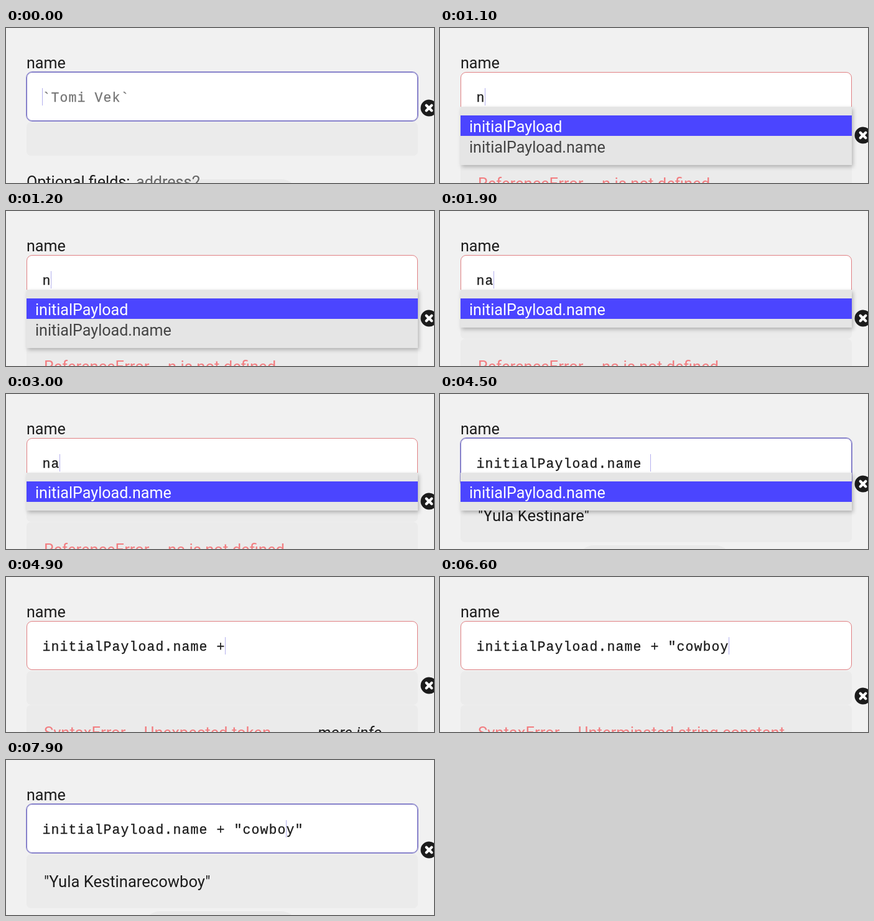
Animation, 688 px wide and 250 px high, one loop 8000 ms. Source, as an HTML page:

```html
<!DOCTYPE html>
<html lang="en">
<head>
<meta charset="utf-8">
<title>Field editor</title>
<style>
  html, body { margin: 0; width: 100%; height: 100%; overflow: hidden; background: #f1f1f1; }
  svg { display: block; width: 688px; height: 250px; }
  text { font: 25.1px Roboto, sans-serif; fill: #1c1c1c; white-space: pre; }
  .code { font: 21.5px "Liberation Mono", monospace; letter-spacing: 1.1px; stroke: #1c1c1c; stroke-width: .3; }
  .code.hint { fill: #757575; stroke: #757575; }
  .panel { fill: #ebebeb; }
  #field { fill: #fff; stroke: #e08083; }
  #field.focus { stroke: #7b75c4; }
  #ring { fill: none; stroke: #918cd0; }
  #caret { fill: #b4b0ee; }
  #value, #error text { font-size: 25.6px; }
  #error text { fill: #f27d80; }
  #error #more { font-size: 25px; font-style: italic; fill: #1c1c1c; }
  #menu { filter: drop-shadow(2px 3px 3px rgba(0, 0, 0, .25)); }
  #menu text { fill: #444; }
  #menu .on { fill: #fff; }
</style>
</head>
<body>
<svg viewBox="0 0 688 250">
  <rect width="688" height="250" fill="#f1f1f1"/>
  <rect x="222" y="244" width="246" height="50" rx="25" fill="#e9e9e9"/>
  <g id="optional">
    <text x="33" y="257">Optional fields:</text>
    <text x="209" y="257" style="fill:#666">address2</text>
  </g>
  <text x="33" y="65">name</text>
  <rect id="result" class="panel" x="33" y="152" width="629" height="54" rx="7"/>
  <text id="value" x="61" y="205"></text>
  <g id="error">
    <rect class="panel" x="33" y="206.5" width="629" height="88" rx="7"/>
    <text id="message" x="61" y="260"></text>
    <text id="more" x="501" y="260">more info</text>
  </g>
  <rect id="ring" x="32.5" y="70.5" width="630" height="80" rx="9.5"/>
  <rect id="field" x="33.5" y="71.5" width="628" height="78" rx="8.5"/>
  <text id="code" class="code" x="58.5" y="119"></text>
  <g id="menu">
    <rect id="sheet" x="33" y="127" width="629" height="94" fill="#e5e5e5"/>
    <rect x="33" y="141" width="629" height="33" fill="#4b45ff"/>
    <text id="row1" class="on" x="47" y="168"></text>
    <text id="row2" x="47" y="201"></text>
  </g>
  <rect id="caret" y="97" width="1" height="28"/>
  <g id="close">
    <circle r="13.5" fill="#1b1b1b"/>
    <path d="M-4.3-4.3 4.3 4.3M4.3-4.3-4.3 4.3" stroke="#fff" stroke-width="4.2" stroke-linecap="round"/>
  </g>
</svg>
<script>
const LOOP = 8000, CHAR = 14, LEFT = 58;
const PERSON = 'Yula Kestinare', HINT = '`Tomi Vek`';
const PATH = 'initialPayload.name', ROWS = ['initialPayload', PATH];
const OPEN = PATH + ' + "';

const undef = name => ({ error: `ReferenceError – ${name} is not defined`, icon: 173 });
const token = { error: 'SyntaxError – Unexpected token', icon: 175, more: true };
const string = { error: 'SyntaxError – Unterminated string constant', icon: 192 };
const value = text => ({ value: `"${text}"`, icon: 145 });

// Each edit puts the caret at the end and refreshes the suggestions
const type = (text, view, rows = []) => ({ text, view, rows, caret: text.length });

// [start ms, what changes from then on]
const steps = [
  [0, type('', { icon: 129 })],
  [200, { caret: null }],
  [700, { caret: 0 }],
  [1000, type('n', undef('n'), ROWS)],
  [1700, { caret: null }],
  [1900, type('na', undef('na'), [PATH])],
  [2400, { caret: null }],
  [2900, { caret: 2 }],
  [3100, type(PATH, value(PERSON))],
  [3600, { caret: null }],
  [4100, { caret: PATH.length }],
  [4500, type(PATH + ' ', value(PERSON), [PATH])],
  [4900, type(PATH + ' +', token)],
  [5200, type(PATH + ' + ', token)],
  [5400, type(OPEN, string)],
  [5800, type(OPEN + 'c', string)],
  [5900, type(OPEN + 'co', string)],
  [6000, type(OPEN + 'cow', string)],
  [6400, type(OPEN + 'cowb', string)],
  [6500, type(OPEN + 'cowbo', string)],
  [6600, type(OPEN + 'cowboy', string)],
  [6900, type(OPEN + 'cowboy"', value(PERSON + 'cowboy'))],
  [7400, { caret: null }],
  [7800, { caret: OPEN.length + 6 }],
  [7900, { caret: OPEN.length + 5 }],
];

let last = {};
const states = steps.map(([at, change]) => (last = { ...last, ...change, at }));

const $ = id => document.getElementById(id);
const show = (id, on) => $(id).setAttribute('visibility', on ? 'visible' : 'hidden');
const put = (id, text = '') => { $(id).textContent = text; };

function draw({ text, view, rows, caret }) {
  const { error, icon } = view;
  put('code', text || HINT);
  $('code').classList.toggle('hint', !text);
  show('caret', caret !== null);
  if (caret !== null) $('caret').setAttribute('x', LEFT + caret * CHAR);

  $('field').classList.toggle('focus', !error);
  show('ring', !error);
  show('error', error);
  show('more', view.more);
  put('message', error);
  put('value', view.value);
  $('result').setAttribute('height', view.value ? 87 : 54);
  show('optional', !error && !view.value);

  show('menu', rows.length);
  put('row1', rows[0]);
  put('row2', rows[1]);
  $('sheet').setAttribute('height', 28 + 33 * rows.length);
  $('close').setAttribute('transform', `translate(680 ${icon})`);
}

let shown;
const start = performance.now();
function tick() {
  const t = (performance.now() - start) % LOOP;
  const state = states.findLast(s => s.at <= t);
  if (state !== shown) draw(shown = state);
  requestAnimationFrame(tick);
}
tick();
</script>
</body>
</html>
```
